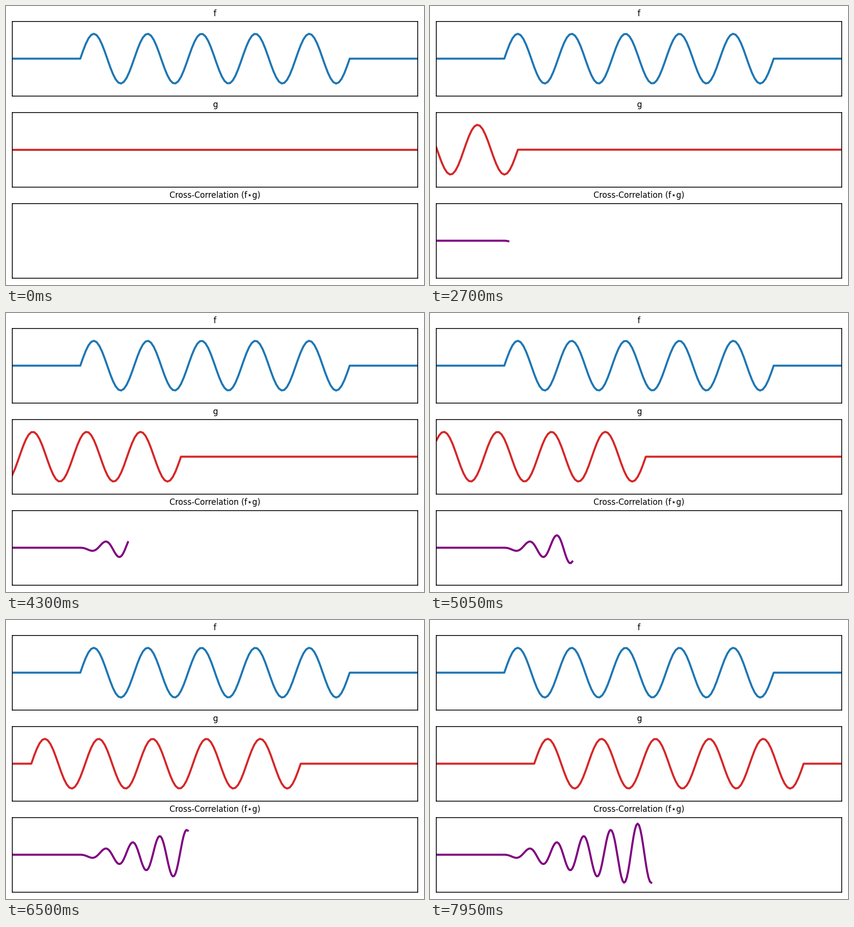
Animation, 864 px wide and 576 px high, one loop 8000 ms. Source, as a matplotlib script:

```python
import numpy as np
import matplotlib.pyplot as plt
from matplotlib.animation import FuncAnimation

WIDTH, HEIGHT, DPI = 864, 576, 100
SAMPLES = 150          # samples across one axis
PULSE = 99             # steps in the sine burst
PERIOD = PULSE / 5     # five cycles per burst
PAD = 25               # flat samples before the burst in f
FRAMES = 160

plt.rcParams["font.family"] = "DejaVu Sans"
plt.rcParams["axes.linewidth"] = 1.2

idx = np.arange(SAMPLES)


def burst(start):
    """Five sine cycles beginning at sample `start`, zero elsewhere."""
    t = idx - start
    inside = (t >= 0) & (t <= PULSE)
    return np.where(inside, np.sin(2 * np.pi * t / PERIOD), 0.0)


def sliding(n):
    """The template g after n steps; it lines up with f at n = 148."""
    return burst(n + PAD - (SAMPLES - 2))


f = burst(PAD)
steps = np.arange(2 * SAMPLES - 1)
corr = np.array([f @ sliding(n) for n in steps])

fig, axes = plt.subplots(3, 1, figsize=(WIDTH / DPI, HEIGHT / DPI), dpi=DPI)
fig.subplots_adjust(left=0.015, right=0.985, bottom=0.025, top=0.945,
                    hspace=0.22)


def setup(ax, title, xmax, ymax, color):
    ax.set_title(title, fontsize=12, pad=8)
    ax.set_xticks([])
    ax.set_yticks([])
    ax.set_xlim(0, xmax)
    ax.set_ylim(-ymax, ymax)
    line, = ax.plot([], [], color=color, lw=3)
    return line


f_line = setup(axes[0], "f", SAMPLES - 1, 1.5, "tab:blue")
g_line = setup(axes[1], "g", SAMPLES - 1, 1.5, "tab:red")
c_line = setup(axes[2], "Cross-Correlation (f\u22c6g)", steps[-1],
               1.2 * corr.max(), "purple")
f_line.set_data(idx, f)


def update(n):
    g_line.set_data(idx, sliding(n))
    c_line.set_data(steps[:n], corr[:n])
    return g_line, c_line


anim = FuncAnimation(fig, update, frames=FRAMES, interval=50,
                     repeat=True, repeat_delay=0, blit=False)

plt.show()
```
